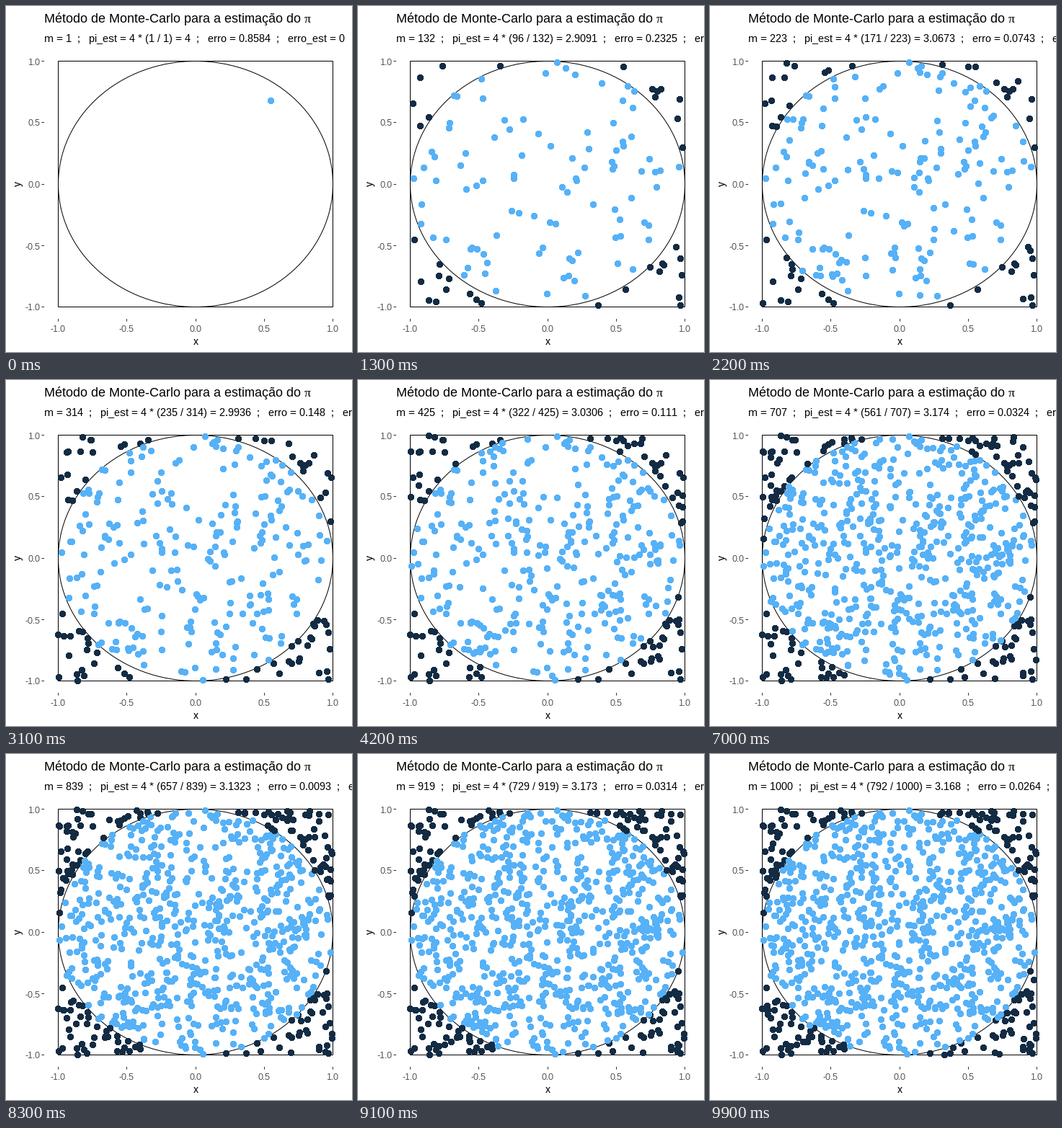
Animation of 480 by 480 pixels, one loop 10 s. Source, as a matplotlib script:

```python
import random

import matplotlib.pyplot as plt
import numpy as np
from matplotlib.animation import FuncAnimation
from matplotlib.patches import Ellipse, Rectangle

SIZE, DPI = 480, 72
FRAMES, INTERVAL = 100, 100
N = 1000
SEED = 666

LEFT, RIGHT, TOP, BOTTOM = 72.5, 453.5, 76.5, 417.5
CX, CY = (LEFT + RIGHT) / 2, (TOP + BOTTOM) / 2
RX, RY = (RIGHT - LEFT) / 2, (BOTTOM - TOP) / 2
PANEL_LEFT, PANEL_BOTTOM, TICK_LEN = 53, 434, 3.67

INSIDE, OUTSIDE = "#56B1F7", "#132B43"
TICK, TICK_TEXT = "#333333", "#4D4D4D"

# Whole-pixel glyph advances without kerning.
plt.rcParams.update({
    "font.family": "Liberation Sans",
    "text.hinting": "native",
    "text.hinting_factor": 1,
    "text.kerning_factor": 6,
})


def r_uniform(seed, count):
    """Uniform numbers as R's set.seed() and runif() give them."""
    state = []
    for step in range(50 + 625):
        seed = (69069 * seed + 1) % 2**32
        if step > 50:
            state.append(seed)
    rng = random.Random()
    rng.setstate((3, tuple(state) + (624,), None))
    return np.array([rng.getrandbits(32) / 2**32 for _ in range(count)])


def to_px(x, y):
    return CX + RX * x, CY - RY * y


def pixel_center(v):
    return np.floor(v) + 0.5


def number(value):
    return f"{round(value, 4):g}"


x, y = 2 * r_uniform(SEED, 2 * N).reshape(2, N) - 1
hit = x**2 + y**2 <= 1
hits = np.cumsum(hit)
spots = pixel_center(np.column_stack(to_px(x, y)))

fig = plt.figure(figsize=(SIZE / DPI, SIZE / DPI), dpi=DPI, facecolor="white")
ax = fig.add_axes([0, 0, 1, 1])
ax.set(xlim=(0, SIZE), ylim=(SIZE, 0))
ax.axis("off")


def label(px, py, text, size, color="black", **kw):
    kw.setdefault("va", "baseline")
    return ax.text(px, py, text, fontsize=size, color=color, **kw)


def line(xs, ys):
    ax.plot(xs, ys, color=TICK, lw=1, snap=False, solid_capstyle="butt")


label(53, 23, "Método de Monte-Carlo para a estimação do", 18)
label(414, 23, "π", 18, family="Liberation Serif")
subtitle = label(53, 50, "", 15)
label(CX, 470, "x", 15, ha="center")
label(17, CY, "y", 15, ha="center", va="center", rotation=90)

for v in (-1, -0.5, 0, 0.5, 1):
    tx, ty = map(pixel_center, to_px(v, v))
    line([tx, tx], [PANEL_BOTTOM, PANEL_BOTTOM + TICK_LEN])
    line([PANEL_LEFT - TICK_LEN, PANEL_LEFT], [ty, ty])
    label(tx - 0.5, 452, f"{v:.1f}", 12, TICK_TEXT, ha="center")
    label(47.5, ty + 5, f"{v:.1f}", 12, TICK_TEXT, ha="right")

outline = dict(fill=False, ec="black", lw=1, snap=False)
ax.add_patch(Rectangle((LEFT, TOP), 2 * RX, 2 * RY, **outline))
ax.add_patch(Ellipse((CX, CY), 2 * RX, 2 * RY, **outline))
dots = ax.scatter(
    *spots.T, s=64, c=np.where(hit, INSIDE, OUTSIDE), linewidths=0,
    antialiased=False, snap=False, zorder=3,
)


def update(frame):
    m = int(1 + (N - 1) * frame / (FRAMES - 1) + 0.5)
    k = hits[m - 1]
    p = k / m
    dots.set_offsets(spots[:m])
    subtitle.set_text(
        "  ;   ".join([
            f"m = {m}",
            f"pi_est = 4 * ({k} / {m}) = {number(4 * p)}",
            f"erro = {number(abs(4 * p - np.pi))}",
            f"erro_est = {number(4 * np.sqrt(p * (1 - p) / m))}",
        ])
    )
    return dots, subtitle


anim = FuncAnimation(
    fig, update, frames=FRAMES, interval=INTERVAL, repeat=True, repeat_delay=0
)
plt.show()
```
